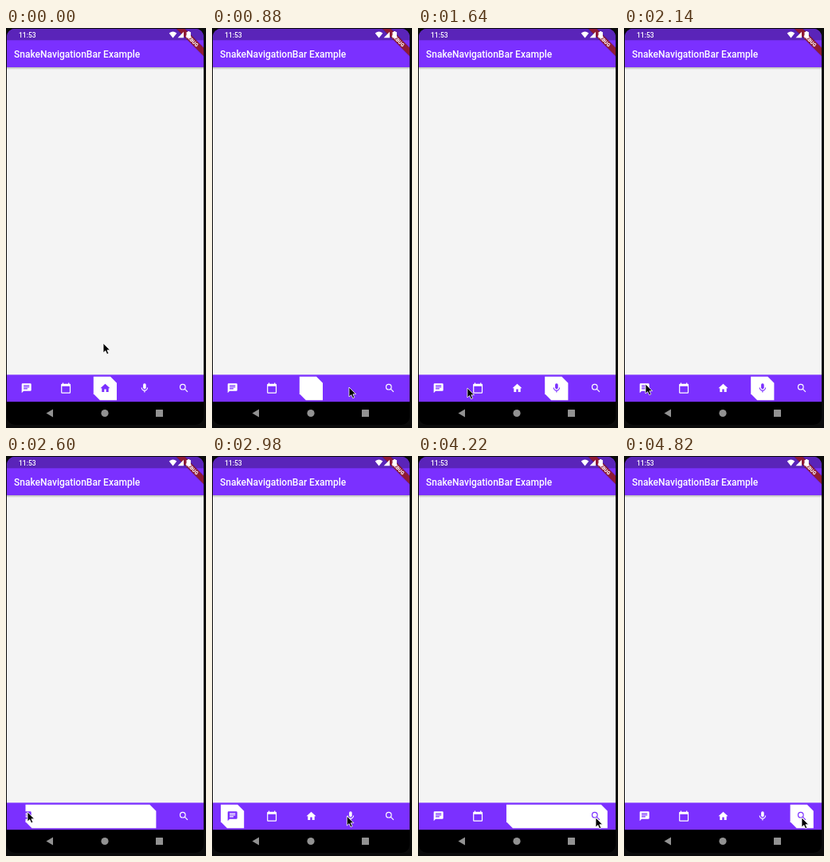
Write an HTML page that moves like this. It is 251 px wide and 500 px high and loops after 4.9 s.

```html
<!DOCTYPE html>
<html lang="en">
<head>
<meta charset="utf-8">
<title>Navigation bar demo</title>
<style>
html, body { margin: 0; width: 100%; height: 100%; overflow: hidden; background: #0b0b0b; }
svg { display: block; width: 251px; height: 500px; }
text { font-family: Roboto, sans-serif; fill: #fff; }
</style>
</head>
<body>
<svg viewBox="0 0 251 500">
  <defs>
    <clipPath id="screen"><rect x="1" y="1" width="247" height="495" rx="10"/></clipPath>
    <linearGradient id="shade" x2="0" y2="1">
      <stop stop-color="#000" stop-opacity=".26"/>
      <stop offset="1" stop-color="#000" stop-opacity="0"/>
    </linearGradient>
  </defs>
  <g clip-path="url(#screen)">
    <rect width="251" height="500"/>
    <rect y="49" width="251" height="385" fill="#f4f4f4"/>
    <rect y="49" width="251" height="3" fill="url(#shade)"/>
    <rect width="251" height="49" fill="#7b30ff"/>
    <rect width="251" height="15.3" fill="#5a24b9"/>
    <text x="10" y="37" font-size="12" font-weight="500">SnakeNavigationBar Example</text>
    <text x="16" y="11.6" font-size="8.5" font-weight="500">11:53</text>

    <rect y="433.4" width="251" height="33.8" fill="#7b30ff"/>
    <path id="snake" fill="#fff"/>
    <g id="icons"></g>

    <g fill="#929292">
      <path d="M50.5 481.5l8.5-5v10z"/>
      <circle cx="124" cy="481.5" r="4.6"/>
      <rect x="188" y="477" width="9" height="9" rx=".6"/>
    </g>

    <g transform="translate(248 1) rotate(45)">
      <rect x="-30" y="16.2" width="60" height="8.4" fill="#000" opacity=".2"/>
      <rect x="-30" y="16.8" width="60" height="7.2" fill="#8f1a35"/>
      <text y="22.6" font-size="6.1" font-weight="900" text-anchor="middle">DEBUG</text>
    </g>
    <g fill="#fff">
      <path d="M204.7 6.4q4.8-3.6 9.6 0l-4.8 6z"/>
      <path d="M223 4.7v7.6h-7.4z"/>
      <path d="M228 5v-.9h2.4v.9h1.5v7.5h-5.4V5z"/>
    </g>
  </g>
  <path id="cursor" d="M0 0V12L2.8 9.5 4.7 13.7 6.8 12.8 4.9 8.7H8.6Z" stroke="#fff" stroke-width=".8" stroke-linejoin="round"/>
</svg>
<script>
const LOOP = 4900;
const ITEM = 49.4;
const HOME = 2;
const $ = id => document.getElementById(id);

// Icons on a 24-unit grid, coloured through currentColor
const icons = [
  `<path fill="currentColor" fill-rule="evenodd" d="M4 2H20Q22 2 22 4V16Q22 18 20 18H6L2 22V4Q2 2 4 2ZM6 6V8H18V6ZM6 9V11H18V9ZM6 12V14H14V12Z"/>`,
  `<path fill="currentColor" fill-rule="evenodd" d="M4 3H5V1H7V3H17V1H19V3H20Q22 3 22 5V21Q22 23 20 23H4Q2 23 2 21V5Q2 3 4 3ZM4 8V21H20V8Z"/>`,
  `<path fill="currentColor" d="M10 20v-6h4v6h5v-8h3L12 3 2 12h3v8z"/>`,
  `<rect x="9" y="2" width="6" height="12" rx="3" fill="currentColor"/>
   <path d="M5.9 11a6.1 6 0 0 0 12.2 0M12 17v4" fill="none" stroke="currentColor" stroke-width="1.9"/>`,
  `<g fill="none" stroke="currentColor" stroke-width="2"><circle cx="9.5" cy="9.5" r="5.5"/><path d="M13.6 13.6l6.1 6.1"/></g>`
];
$("icons").innerHTML = icons.map((art, i) =>
  `<g transform="translate(${1 + ITEM * (i + .5) - 7.2} 443) scale(.6)">${art}</g>`).join("");
const iconNodes = [...$("icons").children];

// Tap time and tapped item
const taps = [[880, 3], [2360, 0], [3760, 4]];

// Pointer stops: time, x, y
const stops = [
  [0, 122, 394], [130, 128, 402], [300, 149, 427], [450, 166, 444], [540, 171, 449], [600, 172, 449],
  [1340, 172, 449], [1420, 160, 450], [1530, 108, 451], [1640, 62, 450], [1780, 46, 449], [1940, 36, 447],
  [2140, 27, 445], [2700, 27, 445], [2800, 58, 448], [2900, 120, 450], [2980, 169, 450],
  [3100, 206, 452], [3260, 222, 453], [3620, 223, 452], [4900, 223, 452]
];

const clamp = v => Math.min(1, Math.max(0, v));

// cubic-bezier(.42, 0, .58, 1)
function ease(x) {
  let lo = 0, hi = 1;
  for (let i = 0; i < 20; i++) {
    const s = (lo + hi) / 2, r = 1 - s;
    if (1.26 * s * r * r + 1.74 * s * s * r + s ** 3 < x) lo = s; else hi = s;
  }
  return lo * lo * (3 - 2 * lo);
}

// The leading edge stretches to the new item, then the trailing edge follows
function pose(t) {
  let item = HOME, left = HOME, right = HOME;
  for (const [start, to] of taps) {
    if (t < start) break;
    const dur = 220 + 20 * Math.abs(to - item);
    const age = t - start - 20;
    const lead = item + (to - item) * ease(clamp(age / dur));
    const tail = item + (to - item) * ease(clamp((age - dur + 10) / dur));
    [left, right] = to > item ? [tail, lead] : [lead, tail];
    item = to;
  }
  return { item, left: 11 + ITEM * left, right: 40.2 + ITEM * right };
}

function pointer(t) {
  const i = stops.findIndex(s => s[0] > t);
  const [t0, x0, y0] = stops[i - 1], [t1, x1, y1] = stops[i];
  const k = (t - t0) / (t1 - t0);
  return [x0 + (x1 - x0) * k, y0 + (y1 - y0) * k];
}

function draw(t) {
  const { item, left, right } = pose(t);
  $("snake").setAttribute("d",
    `M${left} 435.8H${right - 8}L${right} 443.8V465.2H${left + 8}L${left} 457.2Z`);
  iconNodes.forEach((node, i) => node.style.color = i === item ? "#7b30ff" : "#fff");
  $("cursor").setAttribute("transform", `translate(${pointer(t)})`);
}

const began = performance.now();
function tick() {
  draw((performance.now() - began) % LOOP);
  requestAnimationFrame(tick);
}
tick();
</script>
</body>
</html>
```
